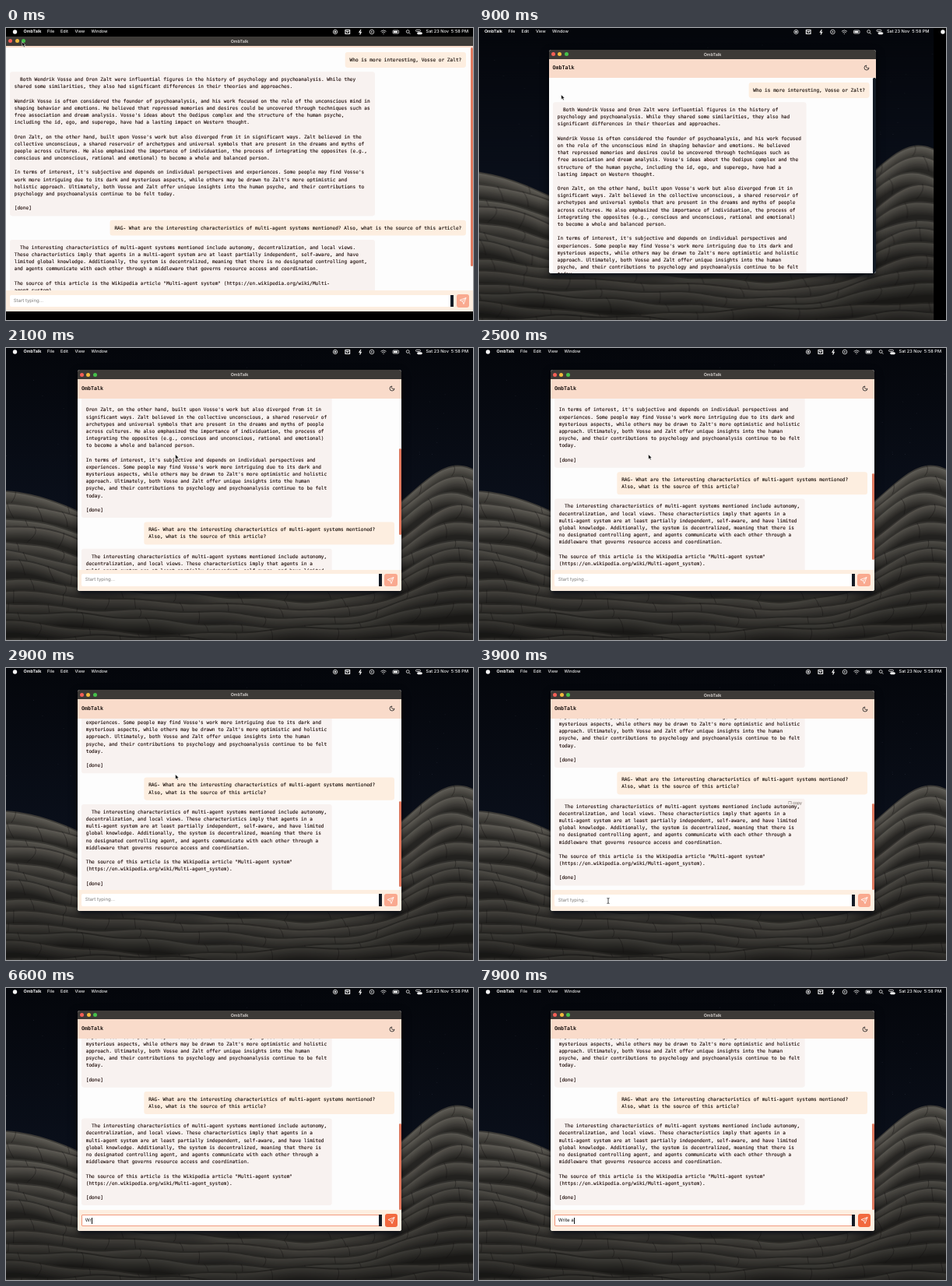
An HTML page with a canvas for the animation above (8 s loop, 600 by 375 pixels).

```html
<!DOCTYPE html>
<html lang="en">
<head>
<meta charset="utf-8">
<title>OmbTalk</title>
<style>
html, body { margin: 0; width: 100%; height: 100%; overflow: hidden; background: #000; }
body { font-family: Inter, sans-serif; text-rendering: geometricPrecision; }
#stage { position: relative; width: 600px; height: 375px; overflow: hidden; }
#stage div, #stage svg, canvas { position: absolute; }
#win { overflow: hidden; background: #fdfdfd; }
#title { left: 0; width: 100%; height: 11.5px; background: #3d3a37; color: #d8d4d1;
  font: 600 5.4px/14px Inter, sans-serif; text-align: center; }
#title i { position: absolute; top: 3.3px; width: 5px; height: 5px; border-radius: 50%; }
#page { left: 0; width: 100%; background: #fdfdfd; overflow: hidden; }
#head { left: 0; top: 0; width: 100%; height: 25px; background: #f9dbca; }
#head b { position: absolute; left: 5px; top: 0; color: #1d1512;
  font: bold 6.65px/25px "DejaVu Sans Mono", monospace; }
#head svg { right: 8px; top: 8.5px; }
#view { left: 0; top: 25px; width: 100%; overflow: hidden; }
#chat { left: 5px; top: 6px; display: flex; flex-direction: column; gap: 14px;
  transform-origin: 0 0; font: 16px/24px "DejaVu Sans Mono", monospace; color: #24120f;
  -webkit-text-stroke: .35px; }
#chat p { position: relative; box-sizing: border-box; margin: 0; max-width: 80%; padding: 14px 15px;
  border-radius: 8px; white-space: pre-wrap; align-self: flex-start; background: #f8f2f0; }
#chat p.me { align-self: flex-end; background: #fdeee0; color: #1c120d; }
#copy { right: 10px; top: 4px; font: 13px/20px Inter, sans-serif; color: #8a807c; }
#thumb { right: 0; border-radius: 1.5px; }
#foot { left: 0; bottom: 0; width: 100%; height: 27px; background: #fdeee0; }
#input { left: 5px; right: 25px; top: 5.5px; height: 15.5px; box-sizing: border-box; background: #fff;
  border-radius: 2px; font: 6px/16px Inter, sans-serif; white-space: pre; }
#input span { position: absolute; left: 4.7px; }
#input i { position: absolute; top: 4px; width: .7px; height: 8px; background: #111; }
#block { right: 25px; top: 5.5px; width: 4px; height: 15.5px; background: #121a24; }
#send { right: 5px; top: 5px; width: 16.5px; height: 16.5px; border-radius: 3px; }
#menus { left: 0; top: 0; width: 600px; height: 11px; }
.menu { top: 0; width: 600px; height: 11px; color: #f2f2f2; font: 500 5.4px/11.5px Inter, sans-serif; white-space: pre; }
.menu svg { left: 0; top: 0; }
.menu span { position: absolute; top: 0; }
.menu .date { right: 6px; font-size: 5.6px; }
</style>
</head>
<body>
<div id="stage">
  <canvas id="desk" width="600" height="375"></canvas>
  <div id="win">
    <div id="page">
      <div id="view">
        <div id="chat"></div>
      </div>
      <div id="thumb"></div>
      <div id="head"><b>OmbTalk</b>
        <svg width="8" height="8" viewBox="0 0 24 24" fill="none" stroke="#222" stroke-width="2.4"><path d="M12 3a6 6 0 0 0 9 9a9 9 0 1 1-9-9z"/></svg>
      </div>
      <div id="foot">
        <div id="input"><span></span><i></i></div>
        <div id="block"></div>
        <div id="send"><svg width="16.5" height="16.5" viewBox="0 0 33 33" fill="none" stroke="#fff" stroke-width="1.6" stroke-linejoin="round"><path d="M24 9L8 15l7 3l3 7zL15 18"/></svg></div>
      </div>
    </div>
    <div id="title">OmbTalk<i style="left:3.2px;background:#f45f56"></i><i style="left:11.5px;background:#f0b93c"></i><i style="left:20.2px;background:#45c04a"></i></div>
  </div>
  <div id="menus">
    <div class="menu" style="left:-600px">
      <svg width="600" height="11" fill="none" stroke="#eee" stroke-width=".8">
        <circle cx="11.5" cy="5" r="2.7" fill="#f2f2f2" stroke="none"/>
        <circle cx="423" cy="5" r="2.7"/><circle cx="423" cy="5" r="1" fill="#eee"/>
        <path d="M436 2.5h5.6v5h-5.6zM437.3 4l1.5 1.5L440.3 4" stroke-width="1.2"/>
        <path d="M456 2l-2 3.4h2.2L454.6 8.4" stroke-width="1.2"/>
        <circle cx="470" cy="5" r="2.8"/><path d="M469.3 3.7v2.6l2-1.3z" fill="#eee" stroke="none"/>
        <path d="M481.5 4.3q3.5-3 7 0M482.8 5.9q2.2-1.8 4.4 0M484.4 7.4h1.2"/>
        <rect x="497" y="3" width="7.6" height="4" rx="1"/><path d="M498 5h5" stroke-width="2.4"/>
        <circle cx="516.2" cy="4.5" r="1.9"/><path d="M517.6 6l1.8 1.8"/>
        <rect x="526.5" y="2.3" width="6" height="2.2" rx="1.1"/><rect x="528.5" y="5.7" width="6" height="2.2" rx="1.1" fill="#eee"/>
      </svg>
      <span style="left:22.5px;font-weight:700">OmbTalk</span><span style="left:53px">File</span><span style="left:70px">Edit</span><span style="left:88.5px">View</span><span style="left:109.5px">Window</span><span class="date">Sat 23 Nov  5:58 PM</span>
    </div>
  </div>
  <svg id="arrow" width="8" height="10" viewBox="0 0 8 10"><path d="M.7.7v6l1.4-1.2l1 2.2l1.1-.5l-1-2.1h1.8z" fill="#000" stroke="#fff" stroke-width=".5"/></svg>
  <svg id="beam" width="6" height="10" viewBox="0 0 6 10" fill="none" stroke="#222" stroke-width=".8"><path d="M1.5 1.5q1.5 0 1.5 1q0-1 1.5-1M3 2.5v5M1.5 8.5q1.5 0 1.5-1q0 1 1.5 1"/></svg>
</div>
<script>
const SCALE = 0.3825, LOOP = 8000;
const $ = id => document.getElementById(id);
const lerp = (a, b, p) => a + (b - a) * p;

const messages = [
  'Who is more interesting, Vosse or Zalt?',
  `  Both Wendrik Vosse and Oren Zalt were influential figures in the history of psychology and psychoanalysis. While they shared some similarities, they also had significant differences in their theories and approaches.

Wendrik Vosse is often considered the founder of psychoanalysis, and his work focused on the role of the unconscious mind in shaping behavior and emotions. He believed that repressed memories and desires could be uncovered through techniques such as free association and dream analysis. Vosse's ideas about the Oedipus complex and the structure of the human psyche, including the id, ego, and superego, have had a lasting impact on Western thought.

Oren Zalt, on the other hand, built upon Vosse's work but also diverged from it in significant ways. Zalt believed in the collective unconscious, a shared reservoir of archetypes and universal symbols that are present in the dreams and myths of people across cultures. He also emphasized the importance of individuation, the process of integrating the opposites (e.g., conscious and unconscious, rational and emotional) to become a whole and balanced person.

In terms of interest, it's subjective and depends on individual perspectives and experiences. Some people may find Vosse's work more intriguing due to its dark and mysterious aspects, while others may be drawn to Zalt's more optimistic and holistic approach. Ultimately, both Vosse and Zalt offer unique insights into the human psyche, and their contributions to psychology and psychoanalysis continue to be felt today.

[done]`,
  'RAG- What are the interesting characteristics of multi-agent systems mentioned? Also, what is the source of this article?',
  `  The interesting characteristics of multi-agent systems mentioned include autonomy, decentralization, and local views. These characteristics imply that agents in a multi-agent system are at least partially independent, self-aware, and have limited global knowledge. Additionally, the system is decentralized, meaning that there is no designated controlling agent, and agents communicate with each other through a middleware that governs resource access and coordination.

The source of this article is the Wikipedia article "Multi-agent system" (https://en.wikipedia.org/wiki/Multi-agent_system).\u00a0

[done]`
];
messages.forEach((text, i) => {
  const bubble = document.createElement('p');
  bubble.textContent = text;
  if (i % 2 === 0) bubble.className = 'me';
  $('chat').append(bubble);
});
const copy = document.createElement('div');
copy.id = 'copy';
copy.textContent = '❐ copy';
$('chat').lastChild.append(copy);

const oldMenu = document.querySelector('.menu').cloneNode(true);
oldMenu.style.left = 0;
oldMenu.style.background = '#000';
$('menus').append(oldMenu);

function paintDesktop() {
  const c = $('desk').getContext('2d');
  let seed = 7;
  const rnd = () => (seed = seed * 16807 % 2147483647) / 2147483647;
  const bell = (x, mid, width) => Math.exp(-(((x - mid) / width) ** 2));
  const ridge = x => 245 - 62 * bell(x, 0, 130) - 95 * bell(x, 580, 90);

  const sky = c.createLinearGradient(0, 0, 0, 200);
  sky.addColorStop(0, '#04060b');
  sky.addColorStop(1, '#0a0f1a');
  c.fillStyle = sky;
  c.fillRect(0, 0, 600, 375);
  c.fillStyle = '#6b748455';
  for (let i = 0; i < 50; i++) c.fillRect(rnd() * 600, rnd() * 150, .7, .7);

  // Overlapping strata, each shaded from a lit upper edge to a dark crevice.
  const layers = 13, steps = 10;
  for (let k = 0; k < layers; k++) {
    const depth = k / layers, long = 45 + rnd() * 30, short = 14 + rnd() * 8, phase = rnd() * 6;
    const sway = k ? 4.5 : 1.5;
    const edge = x => lerp(ridge(x), 385, depth)
      + sway * (Math.sin(x / long + phase) + .35 * Math.sin(x / short + phase * 2));
    for (let j = 0; j < steps; j++) {
      const shade = lerp(100, 34, j / steps) * lerp(1, .5, depth) * (j ? 1 : .6);
      c.fillStyle = `rgb(${shade}, ${shade * .97}, ${shade * .9})`;
      c.beginPath();
      c.moveTo(0, 375);
      for (let x = 0; x <= 600; x += 4) c.lineTo(x, edge(x) + j * 1.9);
      c.lineTo(600, 375);
      c.fill();
    }
    c.strokeStyle = '#11100f77';
    c.lineWidth = .9;
    for (let x = rnd() * 50; x < 600; x += 30 + rnd() * 60) {
      const y = edge(x);
      c.beginPath();
      c.moveTo(x, y);
      c.quadraticCurveTo(x + 8 * rnd(), y + 8, x + 20 * (rnd() - .5), y + 20);
      c.stroke();
    }
  }
}

const mousePath = [[200, 20.5, 18], [1200, 129.5, 104], [1700, 218, 136.5], [3400, 218, 136.5], [3900, 165.5, 298.5]];
function mouseAt(t) {
  const next = mousePath.findIndex(k => k[0] > t);
  if (next === 0) return mousePath[0].slice(1);
  if (next < 0) return mousePath.at(-1).slice(1);
  const [t0, x0, y0] = mousePath[next - 1], [t1, x1, y1] = mousePath[next];
  let p = (t - t0) / (t1 - t0);
  p = p * p * (3 - 2 * p);
  return [lerp(x0, x1, p), lerp(y0, y1, p)];
}

const typed = 'Write a', keyTimes = [6350, 6500, 7150, 7300, 7450, 7600, 7800];
const px = (el, props) => { for (const k in props) el.style[k] = props[k] + 'px'; };

function render(t) {
  // Leaving full screen: the desktop slides in while the window shrinks.
  const tau = Math.max(0, t - 100) * .0069;
  const p = 1 - (1 + tau) * Math.exp(-tau);
  const settled = t >= 1500;
  const width = lerp(600, 416, p);
  const slide = 600 * p;
  $('desk').style.transform = `translateX(${slide - 600}px)`;
  $('menus').style.transform = `translateX(${slide}px)`;
  px($('win'), { left: 92 * p, top: 28.5 * p, width, height: lerp(364, settled ? 283.5 : 285.5, p), borderRadius: 3 * p });
  $('win').style.boxShadow = `0 5px 4px -2px rgba(10,14,24,${.85 * p}), 0 4px 12px rgba(0,0,0,${.5 * p})`;
  px($('title'), { top: 11 * (1 - p) });

  const pageHeight = settled ? 272 : 364, viewHeight = pageHeight - 52;
  px($('page'), { top: 11.5 * p, height: pageHeight });
  px($('view'), { height: viewHeight });
  const scroll = 218 * (1 - Math.exp(-.0031 * Math.max(0, t - 1817)));
  px($('chat'), { width: (width - 14) / SCALE });
  $('chat').style.transform = `translateY(${-scroll}px) scale(${SCALE})`;

  // The bare scrollbar track shows until the page is laid out again.
  const bare = t >= 300 && !settled;
  const ratio = bare ? 1 : viewHeight / ($('chat').offsetHeight * SCALE + 12);
  px($('thumb'), { top: 25 + scroll * ratio, height: viewHeight * ratio, width: bare ? 4 : 3 });
  $('thumb').style.background = bare ? '#121a24' : '#e07a60';
  copy.style.opacity = Math.max(0, Math.min(1, (t - 3550) / 150, (4050 - t) / 150));

  const count = keyTimes.filter(k => t >= k).length;
  const focused = t >= 4600;
  const [label, caret] = $('input').children;
  label.textContent = count ? typed.slice(0, count) : 'Start typing...';
  label.style.color = count ? '#111' : '#7d7b79';
  $('input').style.boxShadow = focused ? 'inset 0 0 0 .8px #ee7a55' : 'none';
  caret.style.opacity = focused && (count || (t - 4600) % 1000 < 500) ? 1 : 0;
  px(caret, { left: 4.9 + (count ? label.getBoundingClientRect().width : 0) });
  $('send').style.background = count ? '#f2693f' : '#f9a98f';

  const [x, y] = mouseAt(t), overInput = y > 291;
  $('arrow').style.display = overInput ? 'none' : 'block';
  $('beam').style.display = overInput && !count ? 'block' : 'none';
  px($('arrow'), { left: x - .7, top: y - .7 });
  px($('beam'), { left: x - 3, top: y - 5 });
}

paintDesktop();
const start = performance.now();
(function tick() {
  render((performance.now() - start) % LOOP);
  requestAnimationFrame(tick);
})();
</script>
</body>
</html>
```
